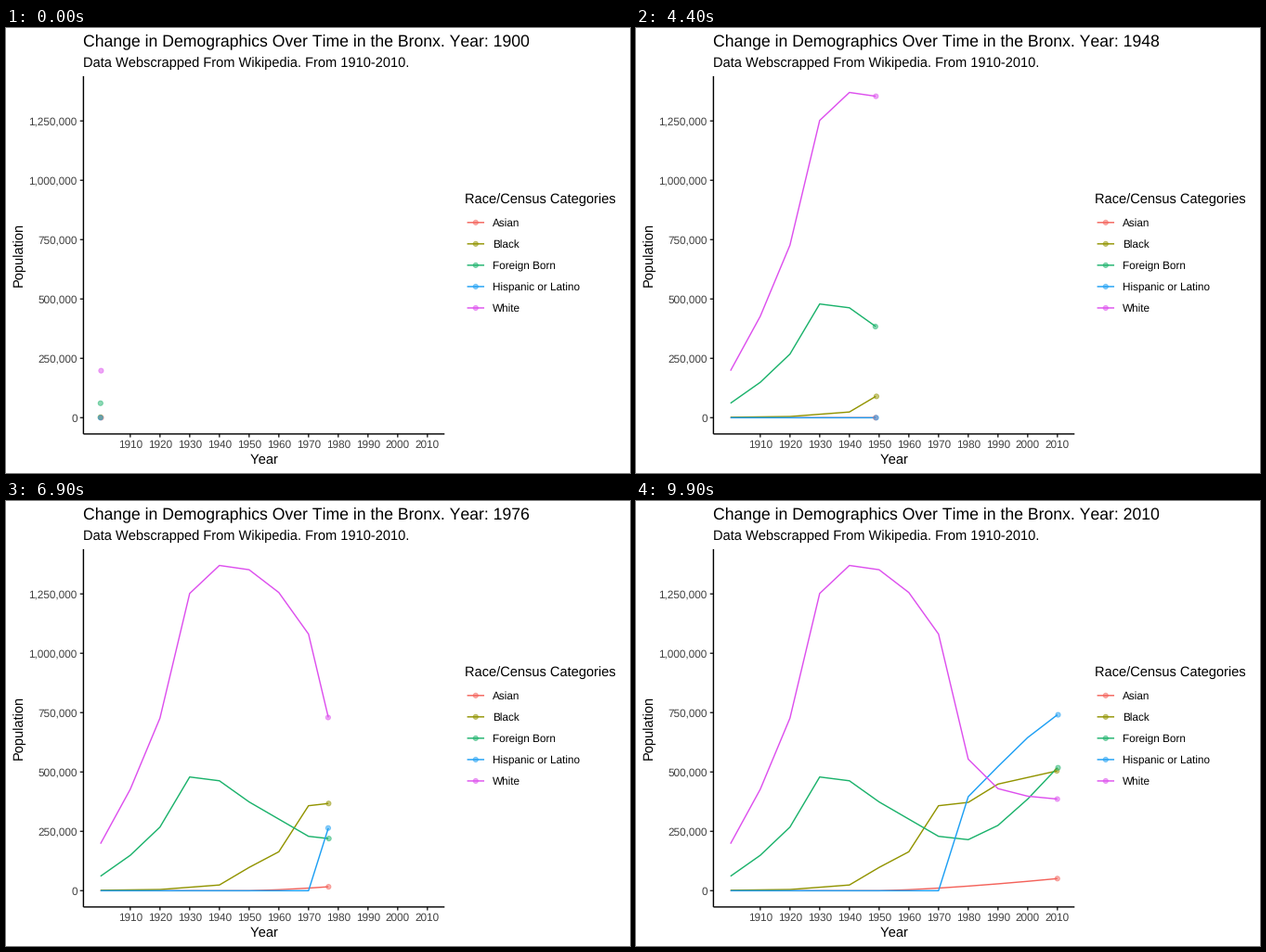
These frames come from a looping animation (672 px wide and 480 px high, 10000 ms). A matplotlib script:

```python
import matplotlib.pyplot as plt
import numpy as np
from matplotlib.animation import FuncAnimation
from matplotlib.patches import Circle

plt.rcParams.update({
    "font.family": "Liberation Sans",
    "text.hinting": "none",
    "text.kerning_factor": 6,  # effectively no kerning
    "path.snap": False,
    "lines.solid_capstyle": "butt",
})

W, H, DPI = 672, 480, 96
PX = 72 / DPI  # points per pixel
FRAMES, INTERVAL = 100, 100
LEFT, RIGHT, TOP, BOTTOM = 83.4, 472.3, 51.9, 437.9
KEY = 23.04
LEGEND_X, LEGEND_Y = 494.3, 209.8

DECADES = np.arange(12)
YEARS = 1900 + 10 * DECADES


def through(*points):
    """Counts for every decade from (decade, thousands) key points."""
    return 1000 * np.interp(DECADES, *zip(*points))


SERIES = {
    "Asian": ("#f4625a", 51000 * (np.maximum(DECADES - 5, 0) / 6) ** 1.4),
    "Black": ("#929400", through((0, 2), (2, 5), (4, 24), (5, 98), (6, 164),
                                 (7, 358), (8, 372), (9, 449), (11, 505))),
    "Foreign Born": ("#1ab26b", through((0, 61), (1, 149), (2, 268), (3, 479),
                                        (4, 463), (5, 374), (7, 229), (8, 215),
                                        (9, 275), (10, 386), (11, 518))),
    "Hispanic or Latino": ("#1c9ff4", through((7, 0), (8, 396), (9, 523),
                                              (10, 645), (11, 741))),
    "White": ("#dd4fee", through((0, 198), (1, 427), (2, 727), (3, 1252),
                                 (4, 1370), (5, 1352), (6, 1256), (7, 1081),
                                 (8, 554), (9, 430), (10, 398), (11, 386))),
}

# Sideways jitter of each dot at each decade, in pixels
rng = np.random.default_rng(4)
JITTER = {name: rng.uniform(-0.8, 0.8, len(DECADES)) for name in SERIES}


def x_pos(year):
    return 101.8 + 3.2 * (year - 1900)


def y_pos(people):
    return 420.35 - 64.02 * people / 250000


fig = plt.figure(figsize=(W / DPI, H / DPI), dpi=DPI, facecolor="white")
ax = fig.add_axes([0, 0, 1, 1])
ax.set_xlim(0, W)
ax.set_ylim(H, 0)
ax.axis("off")


def line(xs, ys, color="black", z=1):
    return ax.plot(xs, ys, color=color, lw=1.42 * PX, zorder=z,
                   solid_joinstyle="round")[0]


def dot(x, y, color):
    return ax.add_patch(Circle((x, y), 2.6, fc=color, ec=color,
                               lw=0.945 * PX, alpha=0.5, zorder=3))


def label(x, y, text, size=11, color="black", ha="left", rotation=0):
    return ax.text(x, y, text, fontsize=size, color=color, ha=ha,
                   va="baseline", rotation=rotation, rotation_mode="anchor")


def draw_axes():
    for year in YEARS[1:]:
        x = x_pos(year)
        line([x, x], [BOTTOM, BOTTOM + 3.67], "#262626")
        label(x, 453, str(year), 8.8, "#414141", "center")
    for people in range(0, 1250001, 250000):
        y = y_pos(people)
        line([LEFT - 3.67, LEFT], [y, y], "#262626")
        label(76.8, y + 4.2, f"{people:,}", 8.8, "#414141", "right")
    line([LEFT, LEFT], [TOP, BOTTOM])
    line([LEFT, RIGHT], [BOTTOM, BOTTOM])
    label((LEFT + RIGHT) / 2, 469.6, "Year", ha="center")
    label(17.2, (TOP + BOTTOM) / 2, "Population", ha="center", rotation=90)


def draw_legend():
    label(LEGEND_X, 189, "Race/Census Categories")
    for i, (name, (color, _)) in enumerate(SERIES.items()):
        y = LEGEND_Y + i * KEY
        line([LEGEND_X + 0.1 * KEY, LEGEND_X + 0.9 * KEY], [y, y], color)
        dot(LEGEND_X + KEY / 2, y, color)
        label(LEGEND_X + KEY + 7, y + 4.2, name, 8.8)


draw_axes()
draw_legend()
title = label(LEFT, 19.2, "", 13.2)
label(LEFT, 41.6, "Data Webscrapped From Wikipedia. From 1910-2010.")
lines = {name: line([], [], color, 2) for name, (color, _) in SERIES.items()}
dots = {name: dot(0, 0, color) for name, (color, _) in SERIES.items()}


def update(frame):
    now = 1900 + 110 * frame / (FRAMES - 1)
    title.set_text("Change in Demographics Over Time in the Bronx. "
                   f"Year: {int(now + 1e-6)}")
    past = YEARS < now - 1e-6
    xs = x_pos(np.append(YEARS[past], now))
    for name, (_, counts) in SERIES.items():
        people = np.interp(now, YEARS, counts)
        lines[name].set_data(xs, y_pos(np.append(counts[past], people)))
        shift = np.interp(now, YEARS, JITTER[name])
        dots[name].center = (x_pos(now) + shift, y_pos(people))
    return [title, *lines.values(), *dots.values()]


anim = FuncAnimation(fig, update, frames=FRAMES, interval=INTERVAL,
                     repeat=True, repeat_delay=0)
plt.show()
```
